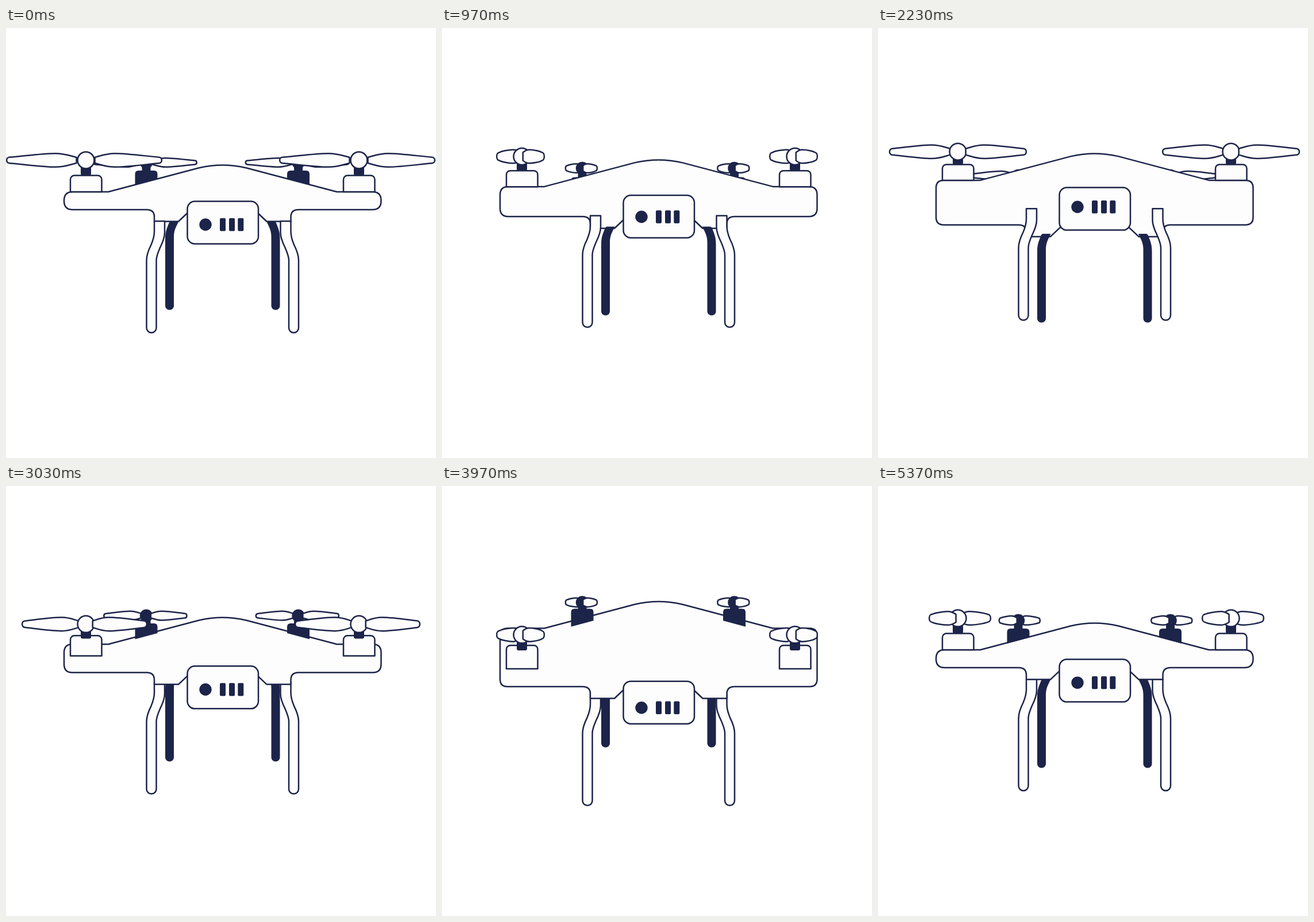
An HTML page with a canvas that plays this animation: 748x748 px, repeating every 5.41 s.

```html
<!DOCTYPE html>
<html lang="en">
<head>
<meta charset="utf-8">
<title>Drone</title>
<style>
html, body { margin: 0; width: 100%; height: 100%; overflow: hidden; background: #fff; }
canvas { display: block; width: 100vw; height: 100vh; }
</style>
</head>
<body>
<canvas id="stage" width="748" height="748"></canvas>
<script>
const ctx = document.getElementById('stage').getContext('2d');
const INK = '#1d2449', PAPER = '#fdfdfd';
const LOOP = 5410, FRAMES = 162, RATE = 0.03;
const BACK = 2130, LEVEL = 2790, FORWARD = 3790;
const MIRROR = new DOMMatrix([-1, 0, 0, 1, 753.5, 0]);

// Each part: height when level, tilted back, tilted forward.
const SWING = {
  hub: [230, 214.8, 259.7],
  stem: [256.5, 237, 287],
  motorTop: [256.5, 237, 277.8],
  motorEnd: [285, 264.5, 319],
  rearHub: [234, 257.5, 201.6],
  cam: [301.5, 277, 340.8],
  lens: [342, 310.5, 387],
  leg: [530, 507.8, 556.6],
  rearLeg: [490, 512.5, 453.2]
};
// These parts return to level halfway between the two tilts.
const HULL = {
  shoulder: [285, 263.7, 246.3],
  base: [316, 344, 350],
  radius: [15, 13, 13],
  rearTop: [248, 275, 212.5],
  rearEnd: [274, 296, 244]
};

// Left and right blade reach for each step of the spin.
const SPIN = [[138, 132], [111, 106], [44, 39], [73, 77], [119, 119],
              [125, 120], [75, 70], [40, 44], [50, 57]];

const sine = u => (1 - Math.cos(Math.PI * u)) / 2;
const mix = (a, b, u) => a + (b - a) * u;

function hermite(u, m0, m1) {
  const u2 = u * u, u3 = u2 * u;
  return m0 * (u3 - 2 * u2 + u) + 3 * u2 - 2 * u3 + m1 * (u3 - u2);
}

function pose(t) {
  const p = {};
  const fill = (set, from, to, u) => {
    for (const k in set) p[k] = mix(set[k][from], set[k][to], u);
  };
  if (t < BACK) {
    const u = sine(t / BACK);
    fill(SWING, 0, 1, u);
    fill(HULL, 0, 1, u);
  } else if (t < FORWARD) {
    fill(SWING, 1, 2, sine((t - BACK) / (FORWARD - BACK)));
    if (t < LEVEL) fill(HULL, 1, 0, hermite((t - BACK) / (LEVEL - BACK), 0, 0.5));
    else fill(HULL, 0, 2, hermite((t - LEVEL) / (FORWARD - LEVEL), 0.75, 0));
  } else {
    const u = sine((t - FORWARD) / (LOOP - FORWARD));
    fill(SWING, 2, 0, u);
    fill(HULL, 2, 0, u);
  }
  return p;
}

function paint(path, fill = PAPER, line = true) {
  ctx.fillStyle = fill;
  ctx.fill(path);
  if (line) ctx.stroke(path);
}

function both(path, fill, line) {
  paint(path, fill, line);
  const other = new Path2D();
  other.addPath(path, MIRROR);
  paint(other, fill, line);
}

function disc(x, y, r, fill, line) {
  const c = new Path2D();
  c.arc(x, y, r, 0, 7);
  paint(c, fill, line);
}

function box(x, y, w, h, r, fill, line) {
  const b = new Path2D();
  b.roundRect(x, y, w, h, r);
  paint(b, fill, line);
}

// Blades get blunter as they turn towards the viewer.
function blade(x, y, side, reach, size) {
  const open = reach / 135;
  const root = Math.max(1, 16 - 20 * (1 - open));
  const w = reach - root;
  const at = (f, h) => `${x + side * size * (root + f * w)},${y + h * size}`;
  const tip = Math.min(5, w * 0.12) / w;
  const neck = mix(8, 5, open), mid = mix(10.5, 6.5, open), end = mix(8, 5.2, open);
  paint(new Path2D(
    `M${at(0, -neck)}C${at(0.1, -neck - 3)} ${at(0.17, -11.8)} ${at(0.3, -11.8)}` +
    `C${at(0.5, -11.8)} ${at(0.8, -mid)} ${at(1 - tip, -end)}` +
    `C${at(1 + tip * 0.3, 0.5 - end)} ${at(1 + tip * 0.3, end - 0.5)} ${at(1 - tip, end)}` +
    `C${at(0.8, mid)} ${at(0.5, 11.8)} ${at(0.3, 11.8)}` +
    `C${at(0.17, 11.8)} ${at(0.1, neck + 3)} ${at(0, neck)}Z`));
}

function rotor(x, y, step, size, hubFill) {
  const [left, right] = SPIN[step];
  const blades = [[-1, left], [1, right]];
  if (right > left) blades.reverse();
  blade(x, y, ...blades[0], size);
  disc(x, y, size === 1 ? 14.5 : 10, hubFill, true);
  blade(x, y, ...blades[1], size);
}

function rearRotors(p, step) {
  for (const x of [244, 508.5]) {
    const l = x - 19.5, r = x + 19.5, top = p.rearTop, end = p.rearEnd;
    const slant = x < 377 ? [end, end - 10.5] : [end - 10.5, end];
    box(x - 7.5, p.rearHub, 15, Math.max(0, top - p.rearHub + 3), 0, INK, false);
    paint(new Path2D(`M${l},${slant[0]}V${top + 6}Q${l},${top} ${l + 6},${top}` +
      `H${r - 6}Q${r},${top} ${r},${top + 6}V${slant[1]}Z`), INK, false);
    rotor(x, p.rearHub, step, 0.665, INK);
  }
}

function frontRotors(p, step) {
  for (const x of [139, 614]) {
    box(x - 27, p.motorTop, 54.5, p.motorEnd - p.motorTop, [7, 7, 0, 0]);
    box(x - 9, p.hub, 18, p.stem - p.hub, [0, 0, 3, 3], INK, false);
    rotor(x, p.hub, step, 1, PAPER);
  }
}

function legs(p) {
  const a = p.rearLeg - 154, b = p.leg - 194;
  both(new Path2D(`M286,${a}H300.5C297,${a + 8} 292,${a + 15} 292,${a + 27}` +
    `V${a + 147.5}a7.5 7 0 0 1 -15 0V${a + 30}C277,${a + 18} 280,${a + 12} 284,${a + 2}Z`), INK, false);
  both(new Path2D(`M258,${b}V${b + 18}Q258,${b + 28} 252.5,${b + 41}` +
    `Q244.5,${b + 57} 244.5,${b + 68}V${b + 185.5}a8.5 8.5 0 0 0 17 0V${b + 68}` +
    `Q261.5,${b + 61} 268,${b + 46}Q276,${b + 30} 276,${b + 20}V${b}Z`));
}

function body(p) {
  const s = p.shoulder, e = p.base, r = p.radius, low = e + 20.5;
  both(new Path2D(`M377,${s - 46.5}C360,${s - 46.5} 350,${s - 45} 335,${s - 41.5}` +
    `L178,${s}H${101 + r}Q101,${s} 101,${s + r}V${e - r}Q101,${e} ${101 + r},${e}` +
    `H245Q258,${e} 258,${e + 13}V${low}H300L317,${low - 16}L322,${low - 19}H377`));
}

function camera(p) {
  box(315.5, p.cam, 123.5, 74, 13);
  disc(347, p.lens, 10.7, INK, false);
  for (const x of [372, 388, 403.3]) box(x, p.lens - 11.2, 10, 22.4, 2, INK, false);
}

function draw(n) {
  const t = n / RATE, p = pose(t), step = n % SPIN.length;
  ctx.fillStyle = '#fff';
  ctx.fillRect(0, 0, 748, 748);
  ctx.strokeStyle = INK;
  ctx.lineWidth = 2.5;
  ctx.lineJoin = 'round';
  if (t < LEVEL) {
    rearRotors(p, step);
    body(p);
    legs(p);
  } else {
    legs(p);
    body(p);
    rearRotors(p, step);
  }
  camera(p);
  frontRotors(p, step);
}

const start = performance.now();
function tick() {
  const t = (performance.now() - start) % LOOP;
  draw(Math.min(FRAMES - 1, Math.floor((t + 4) * RATE)));
  requestAnimationFrame(tick);
}
tick();
</script>
</body>
</html>
```
